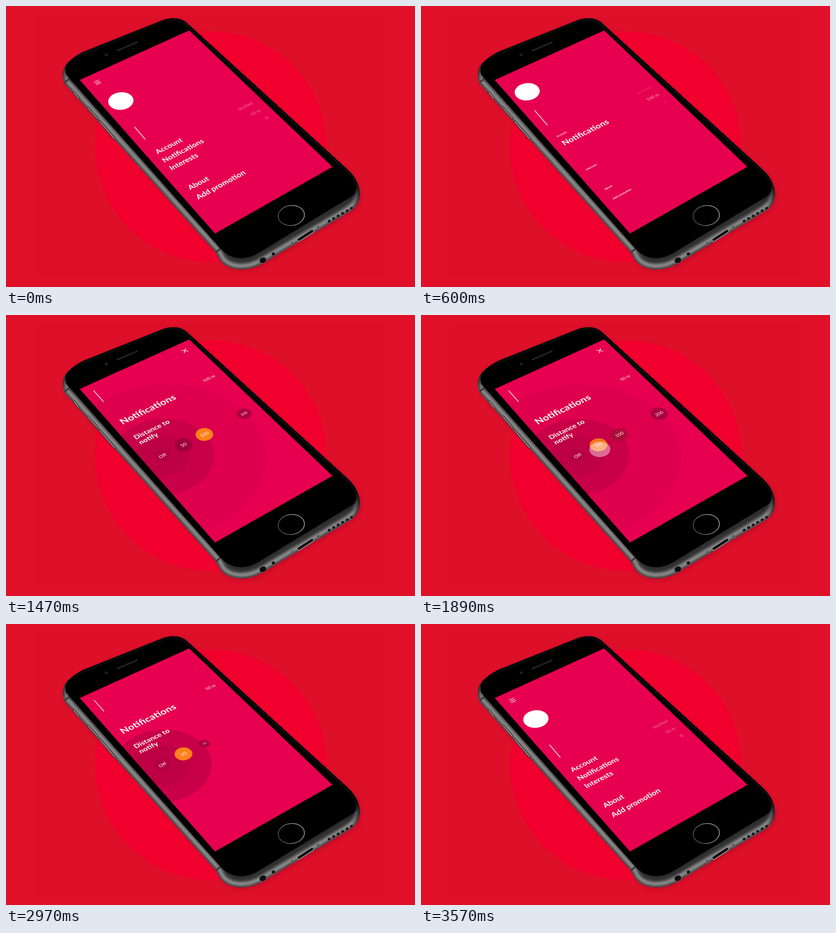
Recreate the animation shown at these times as an HTML page with a canvas. Size 901 by 621 pixels, loop 3.6 s.

```html
<!DOCTYPE html>
<html lang="en">
<head>
<meta charset="utf-8">
<title>Notification settings</title>
<style>
  html, body { margin: 0; width: 100%; height: 100%; overflow: hidden; background: #e01029; }
  canvas { display: block; }
</style>
</head>
<body>
<canvas id="stage" width="901" height="621"></canvas>
<script>
const LOOP = 3600, W = 901, H = 621;
const SCREEN = { w: 375, h: 667 };
const CORNERS = [[162.5, 163.5], [403.5, 54], [719, 355.5], [460.5, 502.7]];
const HUB = [52, 351];
const RINGS = [[275, 0.065], [137, 0.16], [72, 0.09]];
const canvas = document.getElementById('stage');
const ctx = canvas.getContext('2d');

// Perspective from the flat screen to the tilted phone.
const lens = (([[x0, y0], [x1, y1], [x2, y2], [x3, y3]]) => {
  const ax = x1 - x2, bx = x3 - x2, sx = x0 - x1 + x2 - x3;
  const ay = y1 - y2, by = y3 - y2, sy = y0 - y1 + y2 - y3;
  const det = ax * by - bx * ay;
  const g = (sx * by - bx * sy) / det, h = (ax * sy - sx * ay) / det;
  return {
    a: x1 - x0 + g * x1, b: x3 - x0 + h * x3, c: x0,
    d: y1 - y0 + g * y1, e: y3 - y0 + h * y3, f: y0, g, h
  };
})(CORNERS);

function project(x, y) {
  const { a, b, c, d, e, f, g, h } = lens;
  const u = x / SCREEN.w, v = y / SCREEN.h, w = 1 + g * u + h * v;
  return [(a * u + b * v + c) / w, (d * u + e * v + f) / w];
}

// Runs draw() in the screen's local plane, with its origin at a stage point.
function tilted(x, y, scale, draw) {
  const { a, b, c, d, e, f, g, h } = lens;
  const xu = a - g * x, xv = b - h * x, yu = d - g * y, yv = e - h * y;
  const det = xu * yv - xv * yu, dx = x - c, dy = y - f;
  const u = (dx * yv - dy * xv) / det, v = (xu * dy - yu * dx) / det;
  const w = 1 + g * u + h * v;
  const kx = scale / w / SCREEN.w, ky = scale / w / SCREEN.h;
  ctx.save();
  ctx.transform(xu * kx, yu * kx, xv * ky, yv * ky, x, y);
  draw();
  ctx.restore();
}

const ramp = (t, from, to) => Math.min(1, Math.max(0, (t - from) / (to - from)));
const quad = p => p < 0.5 ? 2 * p * p : 1 - 2 * (1 - p) ** 2;
const cubic = p => p < 0.5 ? 4 * p ** 3 : 1 - 4 * (1 - p) ** 3;
const linear = p => p;
const thereAndBack = (t, ease, a, b, c, d) => ease(ramp(t, a, b)) - ease(ramp(t, c, d));
const mix = (a, b, p) => a + (b - a) * p;

function text(label, x, y, { size = 14.5, weight = 400, align = 'left', alpha = 1, scale = 1 } = {}) {
  if (alpha <= 0 || scale <= 0.01) return;
  tilted(x, y, scale, () => {
    ctx.globalAlpha = alpha;
    ctx.fillStyle = '#fff';
    ctx.font = `${weight} ${size}px Lato, sans-serif`;
    ctx.textAlign = align;
    ctx.fillText(label, 0, 0);
  });
}

function disc(x, y, r, fill) {
  if (r <= 0) return;
  tilted(x, y, 1, () => {
    ctx.fillStyle = fill;
    ctx.beginPath();
    ctx.arc(0, 0, r, 0, 7);
    ctx.fill();
  });
}

function segments(x, y, alpha, width, list) {
  if (alpha <= 0) return;
  tilted(x, y, 1, () => {
    ctx.globalAlpha = alpha;
    ctx.strokeStyle = '#fff';
    ctx.lineWidth = width;
    ctx.beginPath();
    for (const [x1, y1, x2, y2] of list) {
      ctx.moveTo(x1, y1);
      ctx.lineTo(x2, y2);
    }
    ctx.stroke();
  });
}

function ring(radius, alpha) {
  if (radius <= 0) return;
  ctx.beginPath();
  for (let i = 0; i < 120; i++) {
    const angle = i / 120 * Math.PI * 2;
    ctx.lineTo(...project(HUB[0] + radius * Math.cos(angle), HUB[1] + radius * Math.sin(angle)));
  }
  ctx.fillStyle = `rgba(90,0,40,${alpha})`;
  ctx.fill();
}

function button(label, x, y, size, selected) {
  if (size <= 0) return;
  disc(x, y, 24 * size, 'rgba(130,0,50,.55)');
  if (selected > 0) disc(x, y, 24 * size, `rgba(255,128,28,${selected})`);
  tilted(x, y, size ** 1.5, () => {
    ctx.fillStyle = '#fff';
    ctx.font = '400 14.5px Lato, sans-serif';
    ctx.textAlign = 'center';
    ctx.fillText(label, 0, 5.2);
  });
}

function touch(t, start, end, x, y) {
  const alpha = 0.42 * thereAndBack(t, linear, start, start + 110, end - 130, end);
  const size = mix(20, 28, quad(ramp(t, start, start + 130)));
  if (alpha > 0) disc(x, y, size, `rgba(255,255,255,${alpha})`);
}

// Everything that never moves: backdrop and phone.
function paintPhone(c) {
  const dot = (x, y, rx, ry, fill, stroke) => {
    c.beginPath();
    c.ellipse(x, y, rx, ry, -0.4, 0, 7);
    c.fillStyle = fill;
    c.fill();
    if (stroke) {
      c.strokeStyle = stroke;
      c.lineWidth = 1;
      c.stroke();
    }
  };
  const line = (x1, y1, x2, y2, color, width) => {
    c.beginPath();
    c.moveTo(x1, y1);
    c.lineTo(x2, y2);
    c.strokeStyle = color;
    c.lineWidth = width;
    c.stroke();
  };
  const body = new Path2D('M130 172C123 160 122 136 141 121C150 113 158 108 169 102L340 33.5' +
    'C362 24 385 24 401 40L753 362C778 385 784 415 776 432C772 442 765 449 752 457' +
    'L566 568C535 587 493 588 472 562L462 544Z');
  const glass = new Path2D('M133 152C128 138 134 122 152 114L342 36C362 28 382 29 396 42' +
    'L750 366C772 386 778 405 766 418L556 546C530 562 498 562 476 540Z');

  c.fillStyle = '#e01029';
  c.fillRect(0, 0, W, H);
  c.fillStyle = '#dd0f29';
  c.fillRect(62, 18, 776, 584);
  c.beginPath();
  c.arc(451, 311, 255, 0, 7);
  c.fillStyle = '#f1002e';
  c.fill();

  c.lineCap = 'round';
  c.save();
  c.shadowColor = 'rgba(130,0,25,.3)';
  c.shadowBlur = 9;
  c.shadowOffsetX = 3;
  c.shadowOffsetY = 4;
  c.fillStyle = '#0a0a0b';
  c.fill(body);
  c.restore();

  // Light falls on the left and bottom sides; the far sides stay black.
  c.save();
  c.clip(body);
  for (let depth = 26; depth > 0; depth--) {
    const gray = Math.round(46 + 88 * Math.exp(-(((depth - 8) / 6) ** 2)));
    const light = c.createLinearGradient(-20, 46, -40, 92);
    light.addColorStop(0, '#0a0a0b');
    light.addColorStop(1, `rgb(${gray},${gray},${gray + 1})`);
    c.strokeStyle = light;
    c.lineWidth = depth * 2;
    c.stroke(body);
  }
  line(129, 169, 141, 160, '#3a3a3c', 4);
  line(459, 547, 473, 536, '#3a3a3c', 4);
  c.restore();

  c.fillStyle = '#000';
  c.fill(glass);
  c.strokeStyle = '#161617';
  c.lineWidth = 1;
  c.stroke(glass);

  for (const [x1, y1, x2, y2] of [[150, 191, 160, 204], [181, 225, 201, 248], [207, 256, 239, 293]]) {
    line(x1, y1, x2, y2, '#2c2c2e', 5);
    line(x1, y1, x2, y2, '#8c8c8e', 2.6);
  }

  line(246, 98, 288, 80, '#38383a', 3);
  line(247, 97, 287, 80, '#111', 1.5);
  dot(221, 108, 3, 2.5, '#17171c', '#333338');

  c.beginPath();
  c.ellipse(628.5, 463, 29, 22, -0.12, 0, 7);
  const rim = c.createLinearGradient(600, 470, 657, 456);
  rim.addColorStop(0, '#58585a');
  rim.addColorStop(0.4, '#6c6c6e');
  rim.addColorStop(1, '#a8a8aa');
  c.strokeStyle = rim;
  c.lineWidth = 1.6;
  c.stroke();

  for (let i = 0; i < 6; i++) dot(712 + i * 9.9, 475.5 - i * 5.7, 3.8, 3.3, '#121214', '#77777a');
  line(645, 517, 674, 498, '#98989a', 8);
  line(645, 516.5, 674, 497.5, '#0b0b0d', 5.5);
  dot(631, 524, 3.6, 3, '#4c4c4e', '#909092');
  dot(688, 489, 3.6, 3, '#4c4c4e', '#909092');
  dot(589, 548, 4, 3.5, '#0c0c0e', '#68686b');
  dot(566, 562, 8, 6.5, '#0c0c0e', '#77777a');

  c.beginPath();
  CORNERS.forEach(p => c.lineTo(...p));
  c.fillStyle = '#e70050';
  c.fill();
}

const backdrop = document.createElement('canvas');
backdrop.width = W;
backdrop.height = H;
paintPhone(backdrop.getContext('2d'));

function drawMenu(t, scroll, hide) {
  const shiftX = -93 * scroll, shiftY = -103 * scroll, rest = 1 - hide;
  const item = { size: 21.7, weight: 700, scale: rest };
  const side = { align: 'right', alpha: 0.45 * rest };
  text('Account', 334 + shiftX, 327.5 + shiftY, item);
  text('Interests', 365, 363.5, item);
  text('About', 406, 407, item);
  text('Add promotion', 424, 428, item);
  text('Notifications', mix(349, 257, scroll), mix(346.5, 242.5, scroll),
    { size: mix(21.7, 30, scroll), weight: 700 });

  const distance = t >= 30 && t < 1850 ? '100 m' : '50 m';
  text('Verified', 545 - 100 * scroll, 216 - 96 * scroll, side);
  text(distance, 562 - 100 * scroll, 232 - 96 * scroll,
    { align: 'right', alpha: mix(0.45, 1, scroll) });
  text(t < 1800 ? '6' : '8', 579 - 100 * scroll, 248 - 96 * scroll, side);

  const away = thereAndBack(t, cubic, 365, 1000, 2990, 3560);
  disc(253 - 93 * away, 210 - 100 * away, 35, '#fff');

  const stretch = 1 + 0.24 * Math.sin(Math.PI * scroll);
  const lineX = 283 - 90 * scroll, lineY = 267 - 100 * scroll;
  ctx.beginPath();
  ctx.moveTo(lineX, lineY);
  ctx.lineTo(lineX + mix(24, 22, scroll) * stretch, lineY + mix(28, 25, scroll) * stretch);
  ctx.strokeStyle = '#fff';
  ctx.lineWidth = 1.4;
  ctx.stroke();

  const icon = 1 - thereAndBack(t, linear, 390, 560, 3380, 3540);
  segments(201.5, 168.7, icon, 2, [-6.5, 0, 6.5].map(y => [-8, y, 8, y]));
}

function drawSettings(t) {
  const reach = 275 * thereAndBack(t, quad, 935, 1445, 2730, 3200);
  for (const [radius, alpha] of RINGS) ring(Math.min(reach, radius), alpha);

  const title = { size: 21.5, weight: 700, alpha: thereAndBack(t, linear, 850, 1000, 3020, 3160) };
  text('Distance to', 286, 275.5, title);
  text('notify', 297, 286.5, title);

  const off = thereAndBack(t, quad, 930, 1080, 3050, 3200);
  disc(345, 311, 24 * off, 'rgba(130,0,50,.14)');
  text('Off', 347.3, 313.7, { align: 'center', scale: off });

  const moved = ramp(t, 1800, 1900);
  button('50', 391, 287, thereAndBack(t, quad, 1090, 1280, 2990, 3150), moved);
  button('100', 437, 264, thereAndBack(t, quad, 1200, 1390, 2880, 3085), 1 - moved);
  button('200', 524.5, 218, thereAndBack(t, quad, 1310, 1530, 2740, 2910), 0);

  const close = thereAndBack(t, linear, 900, 1050, 2680, 2820);
  segments(394, 79, close, 2, [[-7.5, -7.5, 7.5, 7.5], [-7.5, 7.5, 7.5, -7.5]]);
}

function render(t) {
  ctx.drawImage(backdrop, 0, 0);
  ctx.save();
  ctx.beginPath();
  CORNERS.forEach(p => ctx.lineTo(...p));
  ctx.clip();
  const scroll = thereAndBack(t, cubic, 300, 970, 2890, 3520);
  const hide = thereAndBack(t, quad, 390, 765, 3180, 3500);
  drawSettings(t);
  drawMenu(t, scroll, hide);
  touch(t, 90, 420, 398, 328);
  touch(t, 1660, 2090, 394, 297);
  const lift = quad(ramp(t, 2230, 2560));
  touch(t, 2230, 2700, mix(391, 393, lift), mix(104, 87, lift));
  ctx.restore();
}

function tick() {
  render(performance.now() % LOOP);
  requestAnimationFrame(tick);
}
tick();
</script>
</body>
</html>
```
